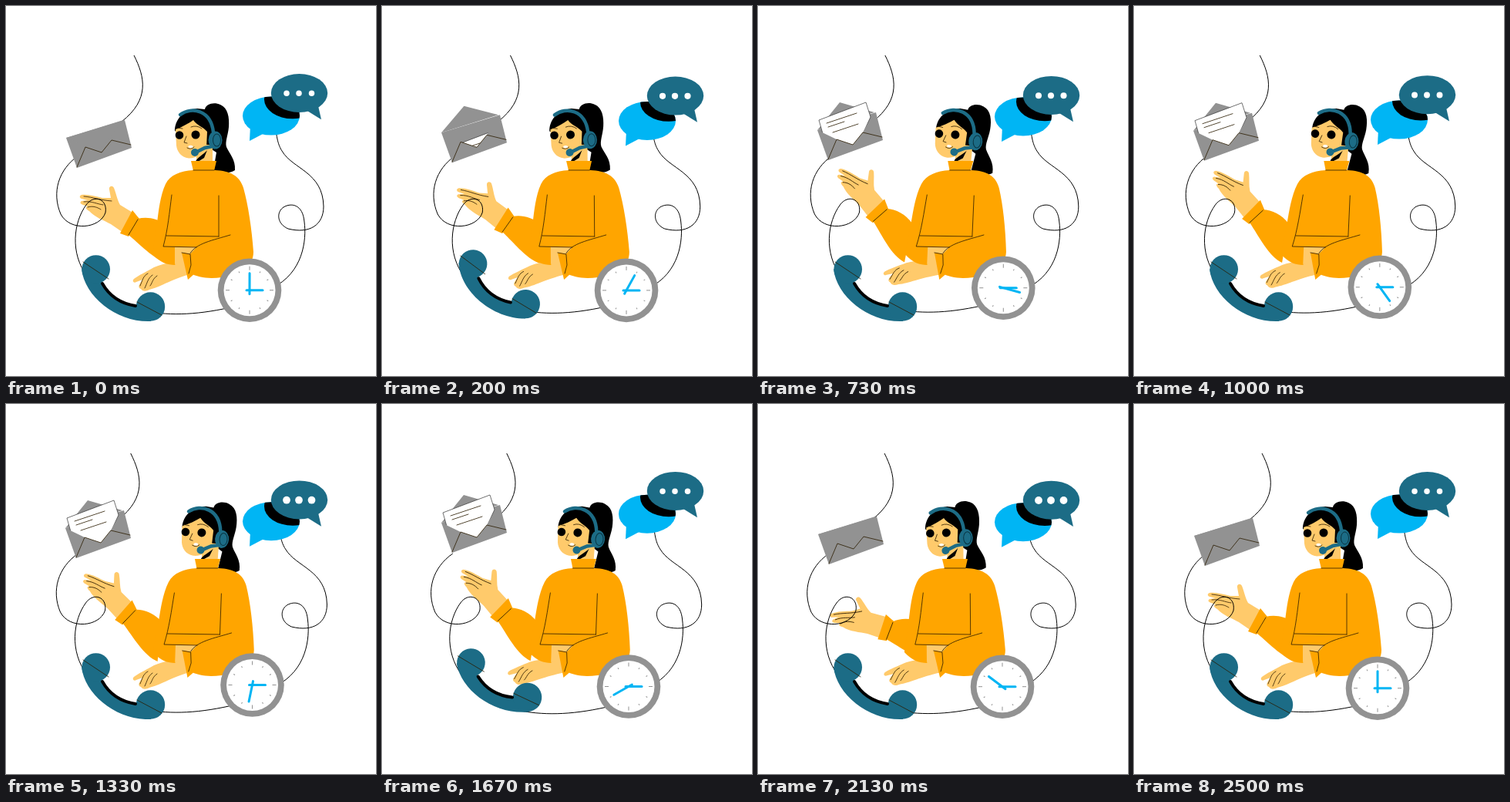
Write an HTML page that moves like this. It is 480x480 px and loops after 2530 ms.

```html
<!DOCTYPE html>
<html lang="en">
<head>
<meta charset="utf-8">
<title>Support agent</title>
<style>
  html, body { margin: 0; width: 100%; height: 100%; overflow: hidden; background: #fff; }
  svg { display: block; width: 100%; height: 100%; }
  .skin { fill: #ffca6b; }
  .orange { fill: #ffa500; }
  .teal { fill: #1c6c86; }
  .gray { fill: #929292; }
  .cyan { fill: #00b5f4; }
  .white { fill: #fff; }
  .line { fill: none; stroke: #000; stroke-width: 1; }
  .thin { fill: none; stroke: #2b1c00; stroke-width: .8; stroke-linecap: round; }
  .band { fill: none; stroke: #1c6c86; stroke-width: 4.5; stroke-linecap: round; }
  .hand { stroke: #00b5f4; stroke-width: 3; stroke-linecap: round; }
</style>
</head>
<body>
<svg viewBox="0 0 480 480">
  <defs>
    <clipPath id="pocketClip"><path d="M78 171 103 183 124 190 137 174 153 146V80H60V171Z"/></clipPath>
    <clipPath id="lightClip"><ellipse cx="344" cy="142.500" rx="37" ry="25"/></clipPath>
  </defs>

  <!-- raised arm -->
  <g id="forearm">
    <g id="palm">
      <path class="skin" d="M166 269 148 258C144 251 143 243 140 236 138 232 133 234 134 238L136 249 125 249C116 247 107 244 98 245 95 246 95 249 98 250L106 252 98 253C95 255 97 257 100 258L106 260C102 261 104 264 108 266 115 274 127 278 136 283L152 294Z"/>
      <path class="thin" d="M101 247C113 248 122 252 137 253M101 254C112 253 118 257 126 258M106 261C113 259 118 261 123 264"/>
    </g>
    <path class="orange" d="M171 276C182 273 196 275 208 284L214 335C195 332 176 311 159 297Z"/>
    <path class="orange" d="M164 265 173 276 159 299 148 295Z"/>
    <path class="thin" d="M171 277 159 297"/>
  </g>

  <!-- head -->
  <g id="head">
    <path d="M219 162C219 149 228 135 248 133L258 134C259 127 270 124 278 128 288 132 290 145 289 157 288 168 284 176 286 183 290 192 298 199 297 213 290 218 278 217 269 213L273 190 250 175Z"/>
    <path class="skin" d="M247 180H268V206H247Z"/>
    <path d="M246 202C247 197 256 193 261 187L257 197 249 202Z"/>
    <g id="face">
      <path class="skin" d="M220 160C229 157 237 152 243 148 248 155 256 157 261 163L260 184C256 191 247 198 237 197.500 227 196 222 189 221 181Z"/>
      <circle cx="225" cy="167.500" r="5.300"/><circle cx="246" cy="167" r="5.500"/>
      <path class="thin" d="M222 158 229 159M240 157Q247 154 254 159M234 169 231 177 235 178M235 184Q240 187 244 183"/>
      <ellipse class="white" cx="239.500" cy="182.500" rx="3" ry="1.700"/>
    </g>
    <path class="band" d="M226 141C241 130 266 135 269 164"/>
    <path class="band" d="M268 182 258 184 246 190"/>
    <circle class="teal" cx="245" cy="190" r="5"/>
    <ellipse class="teal" cx="271.500" cy="174" rx="9" ry="11.500"/>
    <ellipse cx="273.500" cy="174" rx="5" ry="8" fill="none" stroke="#0a3543"/>
  </g>

  <!-- lower hand -->
  <g id="rest">
    <path class="skin" d="M236 328C222 331 206 333 192 339 183 344 171 350 166 354 163 357 166 360 169 358L177 355C173 361 170 365 175 367 178 371 182 370 186 368 199 365 212 356 238 348Z"/>
    <path class="thin" d="M184 347C178 350 177 356 174 363M190 349C184 353 183 360 180 366M196 350C190 354 190 359 187 363"/>
  </g>

  <!-- sweater -->
  <g id="torso">
    <path class="orange" d="M243 213C226 214 213 219 207 231 200 246 198 266 196 281L190 322C200 333 210 336 219 336L230 320 238 346C250 353 264 354 280 352 304 350 321 338 321 319 319 290 314 257 308 236 303 220 291 214 271 213Z"/>
    <path class="orange" d="M240 201H273L270 214H243Z"/>
    <path class="skin" d="M219 313H247L239 322 229 320 232 331 219 335Z"/>
    <path class="orange" d="M228 320 243 322 246 346 236 355Z"/>
    <path class="thin" d="M243 213H270M215 245C212 268 210 290 204 312L247 313M208 298 276 299M276 246V299M228 320 239 322 240 336 237 347M239 321C246 308 268 304 291 297"/>
  </g>

  <!-- connecting thread -->
  <path id="threadTop" class="line" d="M166 64C180 92 187 121 150 150L140 158"/>
  <path id="threadLeft" class="line" d="M94 194C68 212 59 242 71 270 83 293 122 289 129 268 132 250 114 244 104 258 88 280 82 320 106 352"/>
  <path id="threadLow" class="line" d="M180 396C215 402 250 401 300 389"/>
  <path id="threadRight" class="line" d="M345 366C386 346 390 303 387 280 385 257 370 255 360 261 350 268 352 283 366 289 394 296 412 284 412 260 411 215 372 212 358 188 353 180 351 172 349 150"/>

  <g id="mail">
    <path class="gray" d="M78 171 154 148 163 184 92 210Z"/>
    <path id="flap" class="gray"/>
    <g clip-path="url(#pocketClip)">
      <g id="letter">
        <path d="M80 158 141 135 147 154 128 195 92 200Z" fill="#fff" stroke="#333" stroke-width=".7"/>
        <path class="thin" d="M90 162 129 149M92 167 113 160M98 174 131 163"/>
      </g>
    </g>
    <path class="thin" d="M92 209 103 183 124 190 137 174 162 180"/>
  </g>

  <g id="phone">
    <path class="teal" d="M98 341C102 378 145 411 188 409L188 372 170 389C150 387 134 376 124 358Z"/>
    <circle class="teal" cx="116.700" cy="341.500" r="18.300"/><circle class="teal" cx="187.500" cy="390" r="18.700"/>
    <path d="M125 360C134 376 149 386 168 389" fill="none" stroke="#000" stroke-width="4" stroke-linecap="round"/>
    <path class="thin" d="M100 332 133 354M170 384 202 401"/>
  </g>

  <g id="clock">
    <circle class="gray" r="41.300"/><circle class="white" r="33.500"/>
    <g id="ticks" stroke="#929292"></g>
    <path class="hand" d="M-4 0H17"/>
    <path id="minute" class="hand" d="M0 5V-22"/>
  </g>

  <g id="light">
    <path class="cyan" d="M317 155 316 175 335 165Z"/>
    <ellipse class="cyan" cx="344" cy="142.500" rx="37" ry="25"/>
    <g clip-path="url(#lightClip)"><ellipse id="shade" cx="372" cy="121" rx="37" ry="25"/></g>
  </g>
  <g id="dark">
    <path class="teal" d="M388 134 409 147 404 125Z"/>
    <ellipse class="teal" cx="380.500" cy="112.700" rx="36.700" ry="25"/>
    <g class="white" id="dots"><circle cx="364" cy="113"/><circle cx="380" cy="113"/><circle cx="396.500" cy="113"/></g>
  </g>
</svg>
<script>
const LOOP = 2530, RUN = 2500, TAU = Math.PI * 2;
const KEYS = [0, 370, 730, 1330, 1670, 2130, 2500];
const $ = id => document.getElementById(id);
const move = (id, value) => $(id).setAttribute('transform', value);
const wave = phase => (1 - Math.cos(TAU * phase)) / 2;
const ease = (a, b, t) => {
  const u = Math.min(1, Math.max(0, (t - a) / (b - a)));
  return u * u * (3 - 2 * u);
};

// Periodic cubic curve through the values at KEYS.
function track(values) {
  const n = KEYS.length - 1;
  const time = i => KEYS[(i + n) % n] + Math.floor(i / n) * RUN;
  const value = i => values[(i + n) % n];
  const slope = i => (value(i + 1) - value(i - 1)) / (time(i + 1) - time(i - 1));
  return t => {
    let i = 0;
    while (i < n - 1 && t >= KEYS[i + 1]) i++;
    const span = KEYS[i + 1] - KEYS[i], u = (t - KEYS[i]) / span, v = 1 - u;
    return v * v * (1 + 2 * u) * value(i) + u * u * (3 - 2 * u) * value(i + 1)
      + span * u * v * (v * slope(i) - u * slope(i + 1));
  };
}

const lean = track([0, -.15, 1, .8, .8, -.17]);
const lift = track([0, 8, 18, 13, 16, -10]);
const droop = track([0, 0, 0, 0, 0, -6]);
const wrist = track([0, 6, 8, 0, 6, 5]);
const mailY = track([0, -12, -10, -10, -17, -2]);
const clockX = track([316, 318, 318.3, 319.5, 320, 317]);
const clockY = track([368.7, 368.5, 365.7, 364.5, 366.5, 366.7]);

for (let i = 0; i < 12; i++) {
  const tick = document.createElementNS('http://www.w3.org/2000/svg', 'path');
  tick.setAttribute('d', i % 3 ? 'M0-26V-28' : 'M0-26V-31');
  tick.setAttribute('transform', `rotate(${i * 30})`);
  $('ticks').append(tick);
}

function draw(t) {
  const p = t / RUN;

  const s = lean(t), k = .045 * s;
  move('head', `translate(${8.5 * s} ${.5 * s}) rotate(${5 * s} 258 200)`);
  move('face', `translate(${-1.5 * s} ${.5 * s})`);
  move('torso', `matrix(1 0 ${-k} 1 ${k * 340} 0)`);

  move('forearm', `rotate(${lift(t)} 210 258)`);
  move('palm', `rotate(${droop(t)} 161 284)`);
  move('rest', `rotate(${wrist(t)} 234 338)`);

  move('threadTop', `translate(${2.5 * Math.cos(TAU * (p - .1)) - 2} 0)`);
  move('threadLeft', `translate(${2.5 * Math.sin(TAU * p)} 0)`);
  move('threadLow', `translate(0 ${-2.5 * Math.sin(TAU * p)})`);
  move('threadRight', `translate(${2.5 * (.93 - Math.cos(TAU * (p + .06)))} 0)`);

  const flap = ease(30, 220, t) - ease(1880, 2070, t);
  const out = ease(100, 350, t) - ease(1740, 1990, t);
  move('mail', `translate(${-flap} ${mailY(t)})`);
  $('flap').setAttribute('d', `M78 171 ${120 - 13 * flap} ${188 - 53 * flap} 152 148Z`);
  move('letter', `translate(0 ${55 * (1 - out)})`);

  // The phone hops twice per loop.
  const u = Math.min(1, Math.max(0, (p * 2 % 1 - .07) / .385));
  move('phone', `translate(0 ${-11.5 * wave(u)}) rotate(${3 * Math.sin(TAU * u)} 152 367)`);

  move('clock', `translate(${clockX(t)} ${clockY(t)})`);
  move('minute', `rotate(${360 * p})`);

  const lightY = 11.5 * wave(3 * p + .03), darkY = 12 * wave(3 * p - .05);
  move('light', `translate(0 ${lightY})`);
  move('dark', `translate(0 ${darkY})`);
  move('shade', `translate(0 ${darkY - lightY})`);
  for (const dot of $('dots').children) dot.setAttribute('r', 3.7 + darkY * .1);
}

const start = performance.now();
function frame() {
  draw(Math.min(RUN, (performance.now() - start) % LOOP));
  requestAnimationFrame(frame);
}
frame();
</script>
</body>
</html>
```
